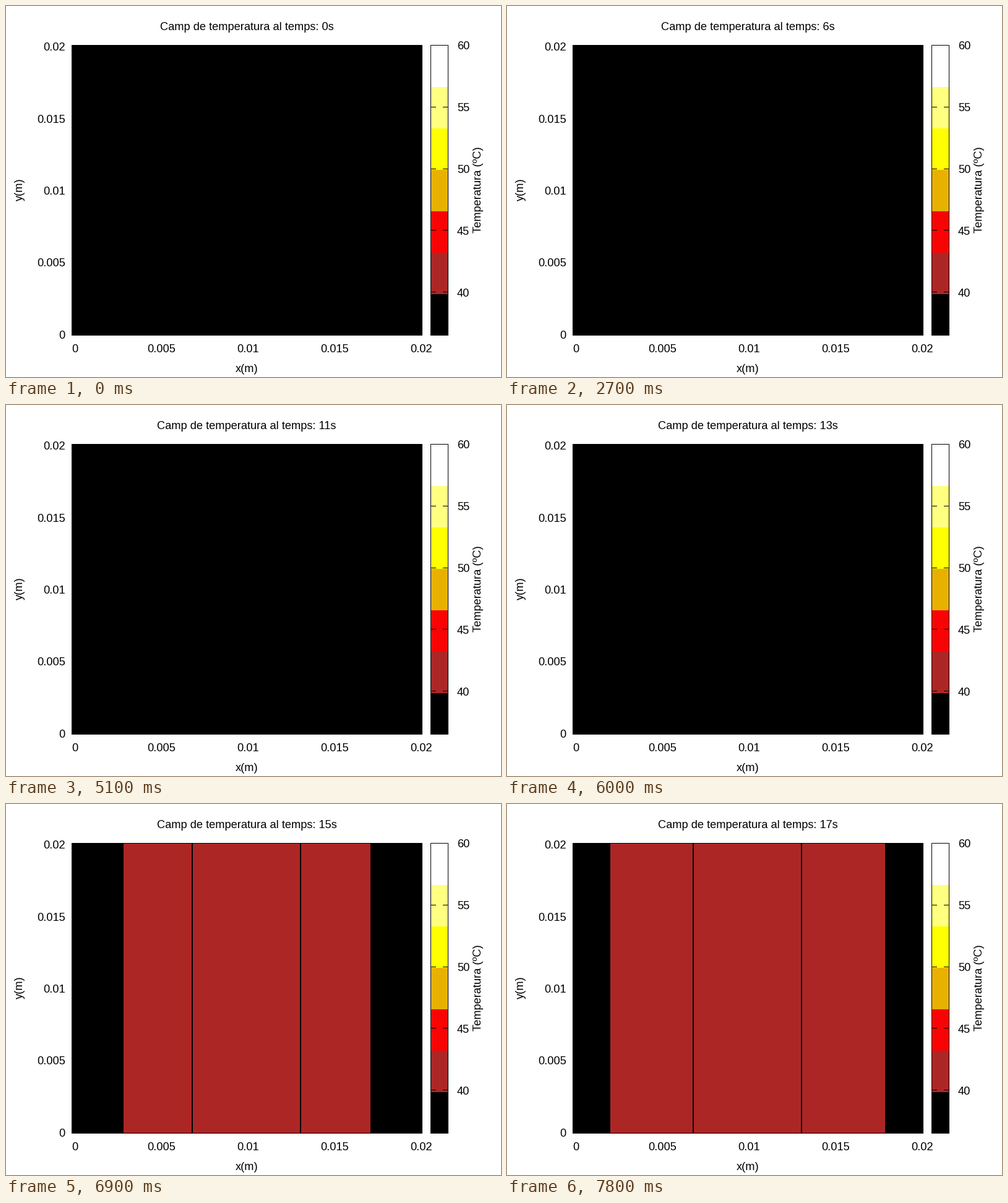
Animation of 800x600 px, one loop 8000 ms. Source, as a matplotlib script:

```python
import math

import matplotlib.pyplot as plt
from matplotlib.animation import FuncAnimation
from matplotlib.patches import Rectangle

W, H, DPI = 800, 600, 100
FONT = 18.3 * 72 / DPI
LEFT, RIGHT, TOP, BOTTOM = 106, 673, 63, 533
BAR_L, BAR_R = 686, 715
BROWN = "#ad2626"
PALETTE = ["white", "#ffff80", "#ffff00", "#e8b100", "#f80404", BROWN, "black"]

FRAME_MS, FRAMES, HOLD = 100, 80, 3
WARM_STEP = 22
# Cells by which the warm zone has grown, step by step
GROWTH = [0, 2, 3, 4, 4]
CELL = 11.2

fig = plt.figure(figsize=(W / DPI, H / DPI), dpi=DPI, facecolor="white")
ax = fig.add_axes([0, 0, 1, 1])
ax.set_xlim(0, W)
ax.set_ylim(H, 0)
ax.axis("off")


def box(x0, y0, x1, y1, color, z=1):
    patch = Rectangle((x0, y0), x1 - x0, y1 - y0, facecolor=color,
                      linewidth=0, antialiased=False, zorder=z)
    return ax.add_patch(patch)


def label(x, y, text, ha="center", rotation=0):
    return ax.text(x, y, text, ha=ha, va="baseline", rotation=rotation,
                   rotation_mode="anchor", fontsize=FONT,
                   family="Liberation Sans", color="black")


# Field
box(LEFT, TOP, RIGHT, BOTTOM, "black")
warm = box(212, TOP + 1, 567, BOTTOM - 1, BROWN, 2)
for x in (300, 475):
    box(x - 0.5, TOP, x + 1.5, BOTTOM, "black", 3)

# Colour bar: black backing leaves a one-pixel frame
box(BAR_L, TOP, BAR_R, BOTTOM, "black")
band = (BOTTOM - TOP - 1) / len(PALETTE)
for k, color in enumerate(PALETTE):
    y = TOP + 0.5 + k * band
    box(BAR_L + 1, max(y, TOP + 1), BAR_R - 1, min(y + band, BOTTOM - 1),
        color, 2)
for k in range(5):
    y = math.floor(TOP + 0.5 + 99.8 * k)
    box(BAR_L, y, BAR_L + 9, y + 1, "black", 3)
    box(BAR_R - 9, y, BAR_R, y + 1, "black", 3)
    label(729, 70 + 100 * k, str(60 - 5 * k), "left")

# Axes
for k, text in enumerate(["0", "0.005", "0.01", "0.015", "0.02"]):
    label(111.2 + 140 * k, 560.5, text)
    label(96, 537.5 - 116.25 * k, text, "right")
label(388.7, 592, "x(m)")
label(27, 296.7, "y(m)", rotation=90)
label(767.7, 296.7, "Temperatura (ºC)", rotation=90)
title = label(389, 39, "")


def draw(i):
    n = i // HOLD
    seconds = math.floor(0.626 * n + 0.73)
    title.set_text(f"Camp de temperatura al temps: {seconds}s")
    warm.set_visible(n >= WARM_STEP)
    if n >= WARM_STEP:
        grown = GROWTH[min(n - WARM_STEP, len(GROWTH) - 1)] * CELL
        x0, x1 = round(212 - grown), round(567 + grown * 0.985)
        warm.set_x(x0)
        warm.set_width(x1 - x0)
    return title, warm


anim = FuncAnimation(fig, draw, frames=FRAMES, interval=FRAME_MS,
                     repeat=True, repeat_delay=0, blit=False)
plt.show()
```
